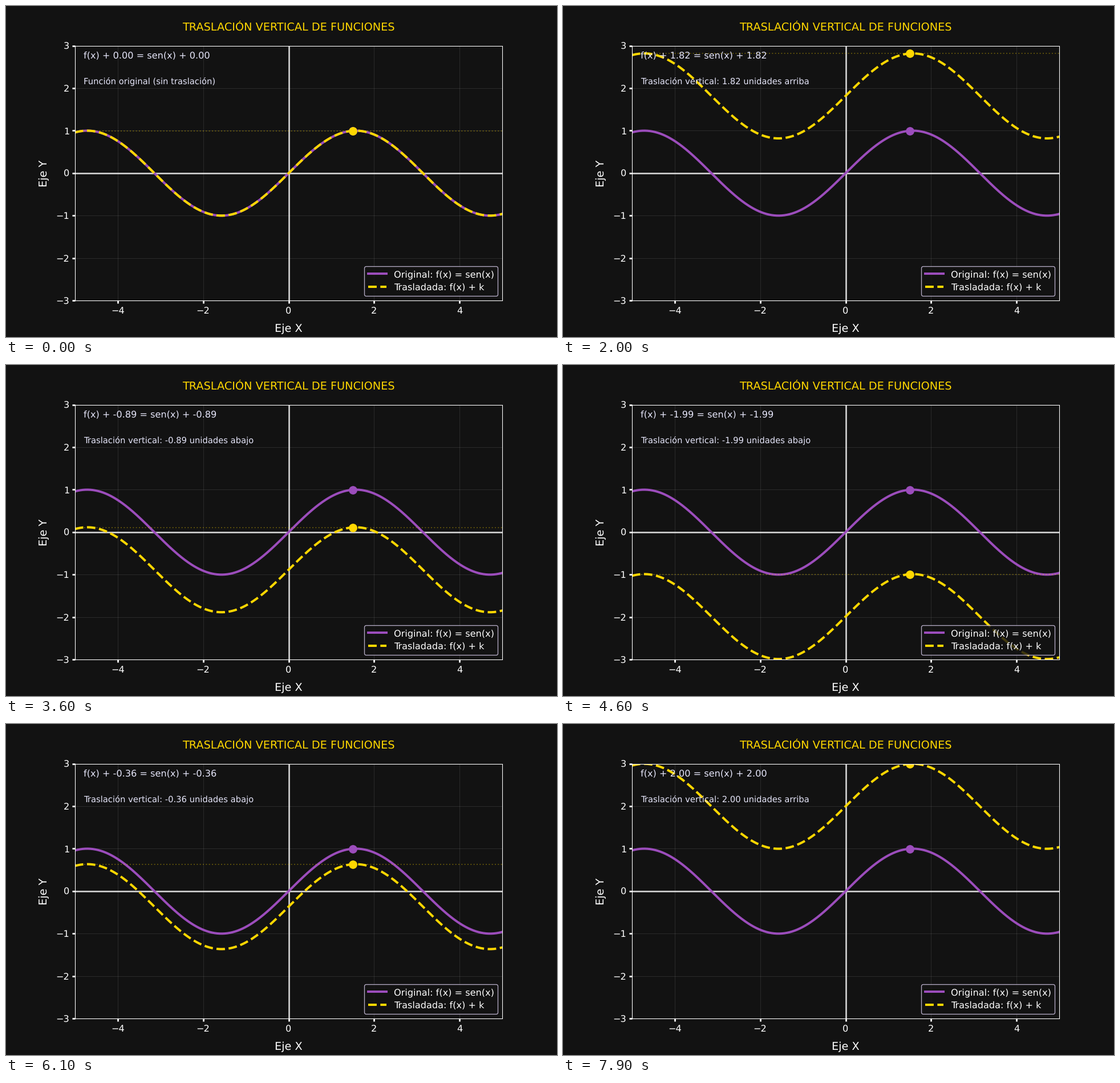
A matplotlib script that plays this animation: 966 by 580 pixels, repeating every 8000 ms.

```python
import numpy as np
import matplotlib.pyplot as plt
from matplotlib.animation import FuncAnimation

BG, GOLD, PURPLE, LAVENDER = "#121212", "#FFD700", "#9C4DBC", "#E6E6FA"
FRAMES, STEP_MS = 80, 100
X_DOT = 1.5

plt.rcParams.update({
    "font.family": "DejaVu Sans",
    "font.size": 12,
    "text.color": "white",
    "text.hinting": "no_hinting",
    "axes.edgecolor": "white",
    "axes.labelcolor": "white",
    "axes.labelsize": "large",
    "axes.titlesize": "large",
    "xtick.color": "white",
    "ytick.color": "white",
    "xtick.major.width": 2,
    "ytick.major.width": 2,
    "xtick.major.pad": 4.7,
})

# 966 x 580 px
fig, ax = plt.subplots(figsize=(10, 6.00415), dpi=96.6, facecolor=BG)
fig.subplots_adjust(left=0.1251, right=0.9008)
ax.set_facecolor(BG)
ax.set(xlim=(-5, 5), ylim=(-3, 3), xticks=range(-4, 5, 2), yticks=range(-3, 4))
ax.grid(color="white", alpha=0.1, linewidth=0.8)
ax.set_title("TRASLACIÓN VERTICAL DE FUNCIONES", color=GOLD, pad=20)
ax.set_xlabel("Eje X", labelpad=10.5)
ax.set_ylabel("Eje Y", labelpad=9)
ax.axhline(0, color="white", linewidth=2, alpha=0.8)
ax.axvline(0, color="white", linewidth=2, alpha=0.8)

x = np.linspace(-5, 5, 500)
ax.plot(x, np.sin(x), color=PURPLE, linewidth=3, label="Original: f(x) = sen(x)")
moved, = ax.plot(x, np.sin(x), "--", color=GOLD, linewidth=3,
                 label="Trasladada: f(x) + k")
level = ax.axhline(1, color=GOLD, linestyle=":", linewidth=1.5, alpha=0.3)
ax.plot([X_DOT], [np.sin(X_DOT)], "o", color=PURPLE, markersize=10)
dot, = ax.plot([X_DOT], [np.sin(X_DOT)], "o", color=GOLD, markersize=10)

formula = ax.text(0.02, 0.95, "", transform=ax.transAxes, color=LAVENDER, fontsize=12)
note = ax.text(0.02, 0.85, "", transform=ax.transAxes, color=LAVENDER, fontsize=11)
ax.legend(loc="lower right", facecolor=BG, edgecolor="#DCD0F0", framealpha=0.8,
          handleheight=1.1, labelspacing=0.4)


def describe(k):
    if abs(k) < 0.01:
        return "Función original (sin traslación)"
    return f"Traslación vertical: {k:.2f} unidades {'arriba' if k > 0 else 'abajo'}"


def update(i):
    k = 2 * np.sin(0.1 * i)
    top = np.sin(X_DOT) + k
    moved.set_ydata(np.sin(x) + k)
    dot.set_ydata([top])
    level.set_ydata([top, top])
    formula.set_text(f"f(x) + {k:.2f} = sen(x) + {k:.2f}")
    note.set_text(describe(k))
    return moved, dot, level, formula, note


anim = FuncAnimation(fig, update, frames=FRAMES, interval=STEP_MS,
                     repeat=True, repeat_delay=0, blit=False)
plt.show()
```
